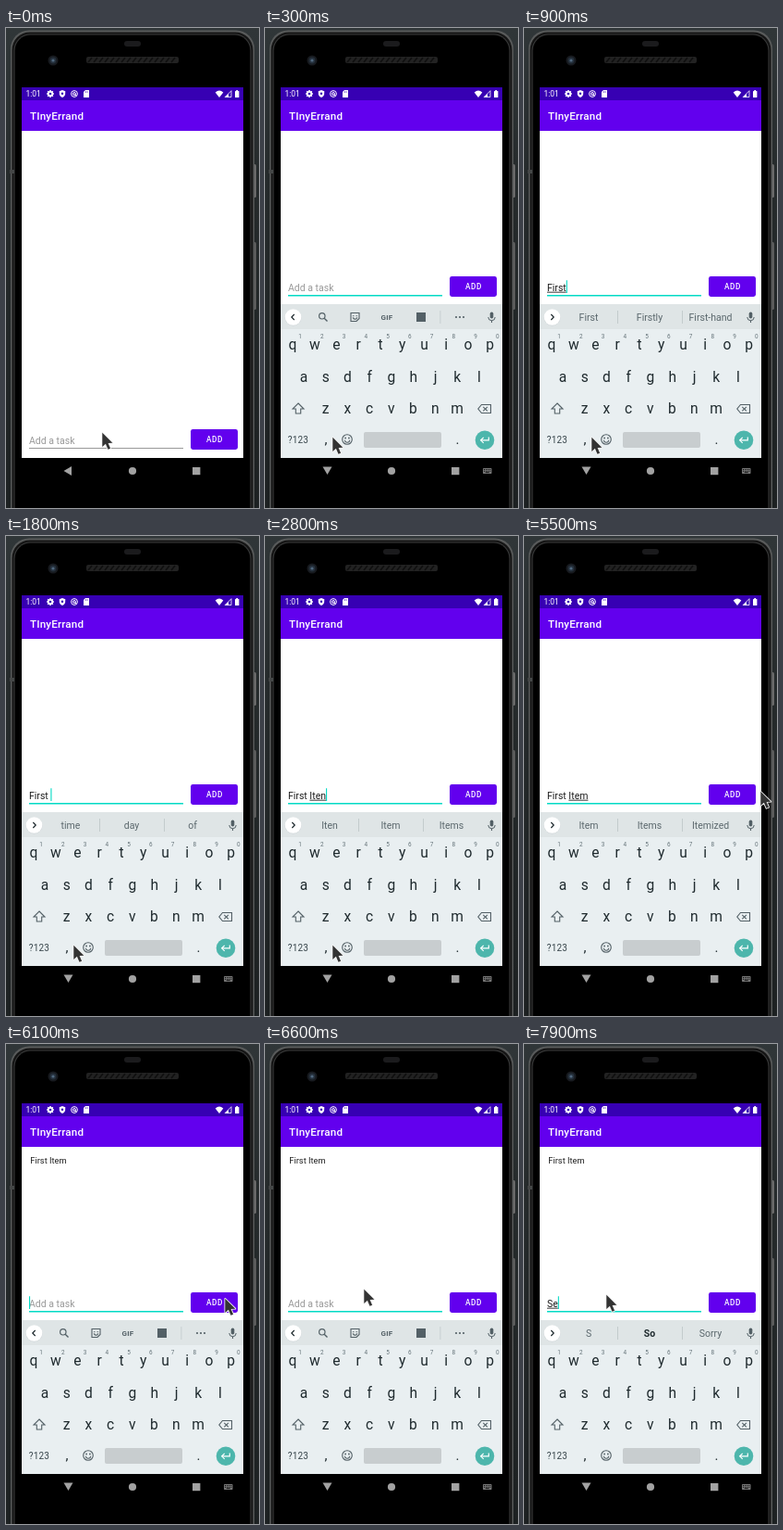
These frames come from a looping animation (274x518 px, 8 s). An HTML page with a canvas:

```html
<!DOCTYPE html>
<html lang="en">
<head>
<meta charset="utf-8">
<title>Task list demo</title>
<style>
html, body { margin: 0; width: 100%; height: 100%; overflow: hidden; background: #000; }
canvas { display: block; width: 274px; height: 518px; }
</style>
</head>
<body>
<canvas id="stage"></canvas>
<script>
const W = 274, H = 518, LOOP = 8000, STEP = 100;
const canvas = document.getElementById('stage');
const dpr = window.devicePixelRatio || 1;
canvas.width = W * dpr;
canvas.height = H * dpr;
const c = canvas.getContext('2d');

const INK = '#1f2a2e', ICON = '#536066', TEAL = '#03dac5', PURPLE = '#6200ee';
const FIELD = '10.5px Roboto, sans-serif';

// time, field text, start of the underlined word, suggestions (none = toolbar)
const typing = [
  [0, '', 0],
  [400, 'F', 0],
  [500, 'Fi', 0, 'Fi', 'First', 'Find'],
  [600, 'Fir', 0, 'Fir', 'First', 'Fire'],
  [700, 'Firs', 0, 'Firs', 'First', 'Firsts'],
  [800, 'First', 0, 'Firs', 'First', 'Firsts'],
  [900, 'First', 0, 'First', 'Firstly', 'First-hand'],
  [1600, 'First ', 6, 'First', 'Firstly', 'First-hand'],
  [1700, 'First ', 6, 'time', 'day', 'of'],
  [2500, 'First I', 6, 'I', 'In', 'It'],
  [2700, 'First Ite', 6, 'Ite', 'Item', 'Items'],
  [2800, 'First Iten', 6, 'Iten', 'Item', 'Items'],
  [4300, 'First Ite', 6, 'Iten', 'Item', 'Items'],
  [4400, 'First Ite', 6, 'Ite', 'Item', 'Items'],
  [4500, 'First Item', 6, 'Ite', 'Item', 'Items'],
  [4600, 'First Item', 6, 'Item', 'Items', 'Itemized'],
  [6100, '', 0],
  [7700, 'S', 0, 'S', '*So', 'Sorry'],
  [7900, 'Se', 0, 'S', '*So', 'Sorry']
];
const caretOff = [[0, 400], [3900, 4300], [5100, 5600], [6600, 7200]];

// pointer tip: time, x, y
const pointer = [
  [0, 104, 436], [100, 104, 436], [300, 73, 441], [4700, 73, 441],
  [4900, 150, 385], [5100, 258, 274], [5400, 258, 274], [5500, 256, 275],
  [5800, 237, 274], [6100, 237, 274], [6600, 107, 264], [6800, 89, 270], [8000, 89, 270]
];

function rect(x, y, w, h, fill, r = 0) {
  c.fillStyle = fill;
  c.beginPath();
  c.roundRect(x, y, w, h, r);
  c.fill();
}
function disc(x, y, r, fill) {
  c.fillStyle = fill;
  c.beginPath();
  c.arc(x, y, r, 0, 7);
  c.fill();
}
function ring(x, y, r, color, width = 1) {
  c.strokeStyle = color;
  c.lineWidth = width;
  c.beginPath();
  c.arc(x, y, r, 0, 7);
  c.stroke();
}
function trace(points, closed) {
  c.beginPath();
  for (let i = 0; i < points.length; i += 2) c.lineTo(points[i], points[i + 1]);
  if (closed) c.closePath();
}
function poly(points, fill) {
  trace(points, true);
  c.fillStyle = fill;
  c.fill();
}
function line(points, color, width = 1, closed = false) {
  trace(points, closed);
  c.strokeStyle = color;
  c.lineWidth = width;
  c.stroke();
}
function text(str, x, y, font, fill, align = 'left', spacing = 0) {
  c.font = /^[\d.]+px$|^\d+ [\d.]+px$/.test(font) ? font + ' Roboto, sans-serif' : font;
  c.letterSpacing = spacing + 'px';
  c.textAlign = align;
  c.fillStyle = fill;
  c.fillText(str, x, y);
  c.letterSpacing = '0px';
}
function at(x, y, draw) {
  c.save();
  c.translate(x, y);
  draw();
  c.restore();
}

function drawPhone() {
  const back = c.createLinearGradient(0, 0, 0, H);
  back.addColorStop(0, '#303638');
  back.addColorStop(0.3, '#262b2c');
  back.addColorStop(1, '#1d2122');
  rect(0, 0, W, H, back);
  rect(266, 147, 5, 36, '#6a6a6a', 1.5);
  rect(266, 231, 5, 73, '#5c5c5c', 1.5);
  rect(5, 2.5, 264, 560, '#595b5b', 20);
  rect(6.5, 4.5, 261, 560, '#151515', 19);
  rect(8.5, 6.5, 257, 560, '#3a3b3b', 18);
  rect(9.5, 7.5, 255, 560, '#000', 17);
  rect(4, 153, 5, 4, '#454747');
  rect(128, 14, 18, 6, '#1b1b1d', 3);
  disc(51, 35, 5.5, '#171a1f');
  disc(51, 35, 3.4, '#25303c');
  disc(51, 35, 1.6, '#50687e');
  rect(87, 31, 100, 7, '#222', 2);
  for (let x = 89; x < 185; x += 6) line([x, 37, x + 4, 32], '#101010', 1.6);
}

function drawStatus() {
  rect(17, 64, 240, 14, '#3700b3');
  rect(17, 78, 240, 33, PURPLE);
  text('1:01', 21.5, 74.2, '8.4px', '#fff');
  at(48, 71, () => {
    ring(0, 0, 2.2, '#fff', 1.7);
    for (let i = 0; i < 8; i++) {
      c.rotate(Math.PI / 4);
      rect(-0.8, -3.9, 1.6, 1.6, '#fff');
    }
  });
  at(61, 71, () => {
    poly([0, -4, 3.3, -2.7, 3.1, 1, 1.8, 3, 0, 4.1, -1.8, 3, -3.1, 1, -3.3, -2.7], '#fff');
    disc(0, -0.3, 1.2, '#3700b3');
  });
  ring(74, 71, 3.4, '#fff', 1);
  ring(74, 71, 1.4, '#fff', 1);
  line([74.8, 71.8, 76.2, 73.2], '#fff');
  poly([86, 67, 90, 67, 90, 75, 84, 75, 84, 69], '#fff');
  rect(86.3, 68.2, 0.7, 1.6, '#3700b3');
  rect(87.8, 68.2, 0.7, 1.6, '#3700b3');
  c.fillStyle = '#fff';
  c.beginPath();
  c.moveTo(231, 75);
  c.lineTo(226.7, 69.4);
  c.quadraticCurveTo(231, 65.6, 235.3, 69.4);
  c.fill();
  line([244, 67.7, 244, 74.5, 237.2, 74.5], '#fff', 0.8, true);
  poly([241, 71, 241, 74.5, 237.2, 74.5], '#fff');
  rect(248, 68, 4.4, 7, '#fff', 0.6);
  rect(249.3, 67, 1.8, 1.5, '#fff');
  text('TInyErrand', 26, 98.7, '500 11.7px', '#fff', 'left', 0.15);
}

function drawForm(y, state, focus, caret) {
  rect(200, y - 11, 51, 22, PURPLE, 2.4);
  text('ADD', 226, y + 3, '500 8.2px', '#fff', 'center', 0.6);
  if (focus) rect(25, y + 9, 167, 1.5, TEAL);
  else rect(25, y + 9, 167, 0.8, '#777');
  const [, str, from] = state;
  const base = y + 4.7;
  if (str) {
    text(str, 25, base, FIELD, '#1d1d1d');
    const x0 = c.measureText(str.slice(0, from)).width;
    const x1 = c.measureText(str).width;
    if (x1 > x0) rect(25 + x0, y + 5.7, x1 - x0, 0.9, '#222');
  } else {
    text('Add a task', 25, base, FIELD, '#989898');
  }
  if (caret) {
    c.font = FIELD;
    rect(25 + c.measureText(str).width, y - 6.7, 1.1, 13.7, TEAL);
  }
}

function drawMic() {
  rect(243.7, 306.5, 3.6, 7, ICON, 1.8);
  c.strokeStyle = ICON;
  c.lineWidth = 1;
  c.beginPath();
  c.arc(245.5, 312, 3.7, 0, Math.PI);
  c.stroke();
  line([245.5, 315.5, 245.5, 318], ICON, 1.1);
}

function drawToolbar() {
  line([31.7, 309, 28.8, 312, 31.7, 315], INK, 1.2);
  ring(61.8, 310.8, 3.2, ICON, 1.2);
  line([64.2, 313.2, 67.5, 316.5], ICON, 1.4);
  line([93, 307.5, 102, 307.5, 102, 313.5, 99, 316.5, 93, 316.5], ICON, 1.1, true);
  disc(95.8, 310.6, 0.7, ICON);
  disc(99.2, 310.6, 0.7, ICON);
  c.beginPath();
  c.arc(97.5, 312, 2.2, 0.2, Math.PI - 0.2);
  c.stroke();
  text('GIF', 132, 314.8, '700 8px', ICON, 'center', 0.2);
  rect(164, 307, 10, 10, ICON);
  rect(189.5, 305, 0.8, 14, '#c2c9cb');
  for (const x of [207, 211, 215]) disc(x, 312, 1.1, ICON);
}

function drawSuggestions(words) {
  line([29.3, 309, 32.2, 312, 29.3, 315], INK, 1.2);
  rect(101, 305, 0.8, 14, '#bcc4c6');
  rect(171, 305, 0.8, 14, '#bcc4c6');
  words.forEach((word, i) => {
    const bold = word[0] === '*';
    text(bold ? word.slice(1) : word, 70 + 66 * i, 315.8,
      bold ? '700 10.5px' : '10.5px', bold ? INK : '#5b686d', 'center');
  });
}

function drawKeyRow(keys, x, y) {
  [...keys].forEach((key, i) => text(key, x + 23.75 * i, y, '15.6px', INK, 'center'));
}

function drawKeyboard(words) {
  rect(17, 298, 240, 28, '#dfe5e6');
  rect(17, 325, 240, 170, '#e9eff1');
  disc(30.5, 312.5, 9, '#cfd6d8');
  disc(30.5, 312, 8.8, '#fff');
  if (words.length) drawSuggestions(words);
  else drawToolbar();
  drawMic();

  drawKeyRow('qwertyuiop', 30, 346.7);
  [...'1234567890'].forEach((n, i) =>
    text(n, 38 + 23.75 * i, 335.3, '6.4px', '#66747a', 'center'));
  drawKeyRow('asdfghjkl', 42, 381.5);
  drawKeyRow('zxcvbnm', 65.5, 416);

  line([36, 405, 42, 411, 38.7, 411, 38.7, 416, 33.3, 416, 33.3, 411, 30, 411], ICON, 1.1, true);
  line([234.5, 406.5, 244.5, 406.5, 244.5, 415.5, 234.5, 415.5, 230.8, 411], ICON, 1.1, true);
  line([236.3, 408.8, 240.9, 413.3], ICON, 1.1);
  line([240.9, 408.8, 236.3, 413.3], ICON, 1.1);

  text('?123', 36, 448, '10px', '#37454b', 'center', 0.2);
  text(',', 66, 448.5, '15px', INK, 'center');
  ring(89, 444, 5.3, ICON, 1.1);
  disc(87.1, 442.5, 0.9, ICON);
  disc(90.9, 442.5, 0.9, ICON);
  c.beginPath();
  c.arc(89, 444.5, 2.7, 0.1, Math.PI - 0.1);
  c.stroke();
  rect(107, 436, 84, 17, '#c8cdcf', 2);
  text('.', 208.5, 448.5, '15px', INK, 'center');
  disc(238, 444.7, 10.3, '#4db6ac');
  line([242.3, 441.5, 242.3, 444.8, 233.7, 444.8], '#fff', 1.2);
  line([236.7, 441.8, 233.7, 444.8, 236.7, 447.8], '#fff', 1.2);
}

function drawNav(open) {
  const grey = '#a2a2a2';
  rect(17, 464, 240, 54, '#000');
  if (open) {
    poly([62.5, 473.5, 72.5, 473.5, 67.5, 482], grey);
    rect(236, 475, 9.5, 6, '#777', 0.7);
    for (let i = 0; i < 4; i++) {
      rect(237 + 2.1 * i, 476, 1, 1, '#000');
      rect(237 + 2.1 * i, 477.7, 1, 1, '#000');
    }
    rect(238.7, 479.3, 4, 0.8, '#000');
  } else {
    poly([71, 473, 71, 483, 62.5, 478], grey);
  }
  disc(137, 478, 4.1, grey);
  rect(202, 474, 8.4, 8.2, grey);
}

function drawPointer(t) {
  const i = Math.max(1, pointer.findIndex(p => p[0] >= t));
  const [t0, x0, y0] = pointer[i - 1], [t1, x1, y1] = pointer[i];
  const k = (t - t0) / (t1 - t0);
  at(x0 + (x1 - x0) * k, y0 + (y1 - y0) * k, () => {
    const arrow = [0.3, 0.8, 0.3, 16, 3.9, 12.8, 6.5, 18.8, 9.1, 17.7, 6.6, 11.9, 11.4, 11.7];
    c.lineJoin = 'round';
    line(arrow, '#f4f4f4', 1.7, true);
    poly(arrow, '#333');
    c.lineJoin = 'miter';
  });
}

function draw(t) {
  c.setTransform(dpr, 0, 0, dpr, 0, 0);
  const open = t >= 200;
  const state = typing.filter(s => s[0] <= t).pop();
  const caret = !caretOff.some(([a, b]) => t >= a && t < b);

  drawPhone();
  rect(17, 64, 240, 400, '#fff');
  drawStatus();
  if (t >= 6100) text('First Item', 26.3, 128.5, '9.3px', '#222');
  drawForm(open ? 279 : 444, state, open, caret);
  if (open) {
    const slide = 18 * Math.max(0, 1 - (t - 200) / 100);
    at(0, slide, () => drawKeyboard(state.slice(3)));
  }
  drawNav(open);
  drawPointer(t);
}

const start = performance.now();
function tick() {
  const t = (performance.now() - start) % LOOP;
  draw(Math.floor(t / STEP) * STEP);
  requestAnimationFrame(tick);
}
tick();
</script>
</body>
</html>
```
